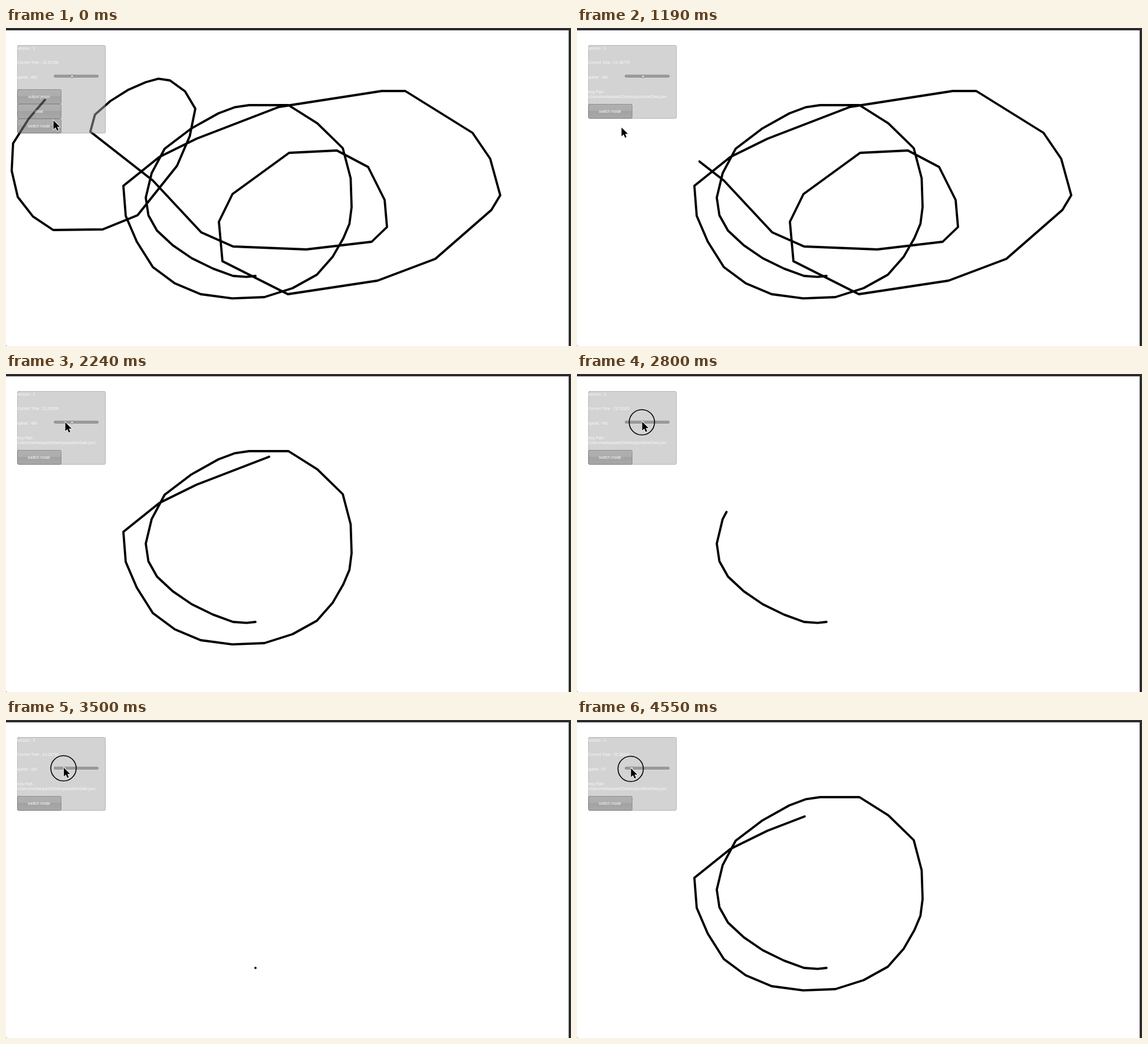
These frames come from a looping animation (958x540 px, 4.62 s). An HTML page with a canvas:

```html
<!DOCTYPE html>
<html lang="en">
<head>
<meta charset="utf-8">
<title>Line playback</title>
<style>
  html, body { margin: 0; width: 100%; height: 100%; overflow: hidden; background: #fff; }
  canvas { display: block; }
</style>
</head>
<body>
<canvas id="stage" width="958" height="540"></canvas>
<script>
const ctx = document.getElementById('stage').getContext('2d');
const LOOP = 4620, STEP = 70, SWITCH = 630, PRESS = 2520;

const coords = [
  423,421, 385,421, 315,391, 256,344, 237,288, 269,205, 360,145, 412,131,
  479,131, 571,204, 586,304, 572,357, 527,419, 438,457, 330,452, 249,406,
  203,319, 199,268, 260,219, 323,188, 463,134, 637,107, 677,107, 791,178,
  821,222, 838,284, 823,309, 728,392, 630,429, 478,452, 367,396, 361,329,
  384,282, 480,212, 561,208, 614,236, 642,292, 646,338, 620,363, 509,376,
  385,371, 331,347, 249,259, 143,176, 177,124, 237,92, 278,89, 321,137,
  290,234, 223,318, 164,342, 80,343, 20,287, 12,196, 66,122
];
const count = coords.length / 2;
const isRound = i => i !== 7 && (i < 16 || (i > 42 && i < 48) || i > 50);

// Halve each span; on round stretches push the middle outwards
const points = [];
for (let i = 0; i < count; i++) {
  const at = (j, axis) => coords[2 * Math.max(0, Math.min(count - 1, j)) + axis];
  const middle = axis => {
    const sum = at(i, axis) + at(i + 1, axis);
    const bulge = isRound(i) ? (sum - at(i - 1, axis) - at(i + 2, axis)) / 18 : 0;
    return sum / 2 + bulge;
  };
  points.push([at(i, 0), at(i, 1)]);
  if (i < count - 1) points.push([middle(0), middle(1)]);
}

// Running length of the path at each point
const lengths = [0];
for (let i = 1; i < points.length; i++) {
  const [a, b] = [points[i - 1], points[i]];
  lengths.push(lengths[i - 1] + Math.hypot(b[0] - a[0], b[1] - a[1]));
}
const total = lengths[lengths.length - 1];

function lengthAt(span) {
  const i = Math.floor(span * 2);
  return lengths[i] + (span * 2 - i) * (lengths[i + 1] - lengths[i]);
}

// Keys: [ms, span reached]; a smaller span means the next lap
let lap = 0;
const travel = [
  [630, 0], [1190, 42.39], [1820, 42.32], [2240, 19.88], [2800, 4.65],
  [3500, 0], [3710, 10.1], [3920, 14.98], [4550, 19.45]
].map(([ms, span], i, keys) => {
  if (i && span < keys[i - 1][1]) lap++;
  return [ms, lap * total + lengthAt(span)];
});

// Keys: [ms, x, y]
const mouse = [
  [560, 80, 157], [1190, 75, 169], [1820, 128, 158], [2240, 100, 82],
  [2800, 110, 81], [3500, 97.5, 81], [4550, 91, 82]
];

function valueAt(keys, t, col = 1) {
  const next = keys.findIndex(key => t < key[0]);
  if (next === 0) return keys[0][col];
  if (next < 0) return keys[keys.length - 1][col];
  const from = keys[next - 1], to = keys[next];
  return from[col] + (to[col] - from[col]) * (t - from[0]) / (to[0] - from[0]);
}

function clock(t) {
  const rate = t < 1190 ? 0.0011889 : 0.0009568;
  return (21.98775 + (t - 1190) * rate).toFixed(5);
}

function drawLine(length) {
  ctx.beginPath();
  ctx.moveTo(...points[0]);
  for (let i = 1; i < points.length; i++) {
    const [a, b] = [points[i - 1], points[i]];
    const part = Math.min(1, (length - lengths[i - 1]) / (lengths[i] - lengths[i - 1]));
    ctx.lineTo(a[0] + (b[0] - a[0]) * part, a[1] + (b[1] - a[1]) * part);
    if (part < 1) break;
  }
  ctx.lineWidth = 3.8;
  ctx.lineCap = ctx.lineJoin = 'round';
  ctx.strokeStyle = '#000';
  ctx.stroke();
}

function box(x, y, w, h, r, fill, stroke) {
  ctx.beginPath();
  ctx.roundRect(x + 0.5, y + 0.5, w - 1, h - 1, r);
  ctx.fillStyle = fill;
  ctx.fill();
  ctx.lineWidth = 1;
  ctx.strokeStyle = stroke;
  ctx.stroke();
}

function label(text, x, y, size = 6.5, align = 'left', alpha = 0.85) {
  ctx.font = `${size}px "Liberation Sans", Arial, sans-serif`;
  ctx.textAlign = align;
  ctx.textBaseline = 'middle';
  ctx.fillStyle = `rgba(255,255,255,${alpha})`;
  ctx.fillText(text, x, y);
}

function button(text, y) {
  const shade = ctx.createLinearGradient(0, y, 0, y + 25);
  shade.addColorStop(0, 'rgba(0,0,0,.17)');
  shade.addColorStop(0.45, 'rgba(0,0,0,.18)');
  shade.addColorStop(0.5, 'rgba(0,0,0,.23)');
  shade.addColorStop(1, 'rgba(0,0,0,.2)');
  box(19, y, 75, 25, 2, shade, 'rgba(0,0,0,.25)');
  label(text, 56, y + 12.8, 6.8, 'center', 1);
}

function drawPanel(t, x) {
  const playing = t >= SWITCH;
  const drag = t > 2800 ? 110 - x : 0;
  const speed = Math.round(400 - 2.7 * drag - 0.808 * drag * drag);
  box(19, 29, 150, playing ? 125 : 150, 2, 'rgba(168,168,168,.5)', 'rgba(90,90,90,.35)');
  label('version : 3', 19, 34.8);
  label('Current Time : ' + clock(t), 19, 59.5);
  label('speed : ' + speed, 19, 84.5);

  box(81, 79.5, 76, 4.5, 2, '#a0a0a0', '#808080');
  box(109 - drag, 79, 6, 6, 1.5, '#cbcbcb', '#8c8c8c');

  if (playing) {
    label('Key Path :', 19, 109.5);
    label('/Users/marlowquint/Desktop/positionData.json', 19, 117.3);
    button('switch mode', 129);
  } else {
    button('output jeson', 104);
    button('clear', 129);
    button('switch mode', 154);
  }
}

function drawMouse(x, y, pressed) {
  if (pressed) {
    ctx.beginPath();
    ctx.arc(x, y + 1, 21.5, 0, Math.PI * 2);
    ctx.lineWidth = 1.6;
    ctx.strokeStyle = '#000';
    ctx.stroke();
  }
  ctx.save();
  ctx.translate(x, y);
  const arrow = new Path2D('M0.5 0V15L4 11.7L6.5 17.3L9 16.2L6.6 10.8H11.3Z');
  ctx.lineWidth = 1.6;
  ctx.lineJoin = 'miter';
  ctx.strokeStyle = '#fff';
  ctx.stroke(arrow);
  ctx.fillStyle = '#000';
  ctx.fill(arrow);
  ctx.restore();
}

function draw(t) {
  ctx.fillStyle = '#2d2d30';
  ctx.fillRect(0, 0, 958, 540);
  ctx.fillStyle = '#fff';
  ctx.beginPath();
  ctx.roundRect(0, 4, 954, 536, [0, 0, 0, 2]);
  ctx.fill();

  const x = valueAt(mouse, t), y = valueAt(mouse, t, 2);
  drawLine(t < SWITCH ? total : valueAt(travel, t) % total);
  drawPanel(t, x);
  drawMouse(x, y, t >= PRESS);
}

const start = performance.now();
function tick() {
  const t = (performance.now() - start) % LOOP;
  draw(Math.floor(t / STEP) * STEP);
  requestAnimationFrame(tick);
}
tick();
</script>
</body>
</html>
```
